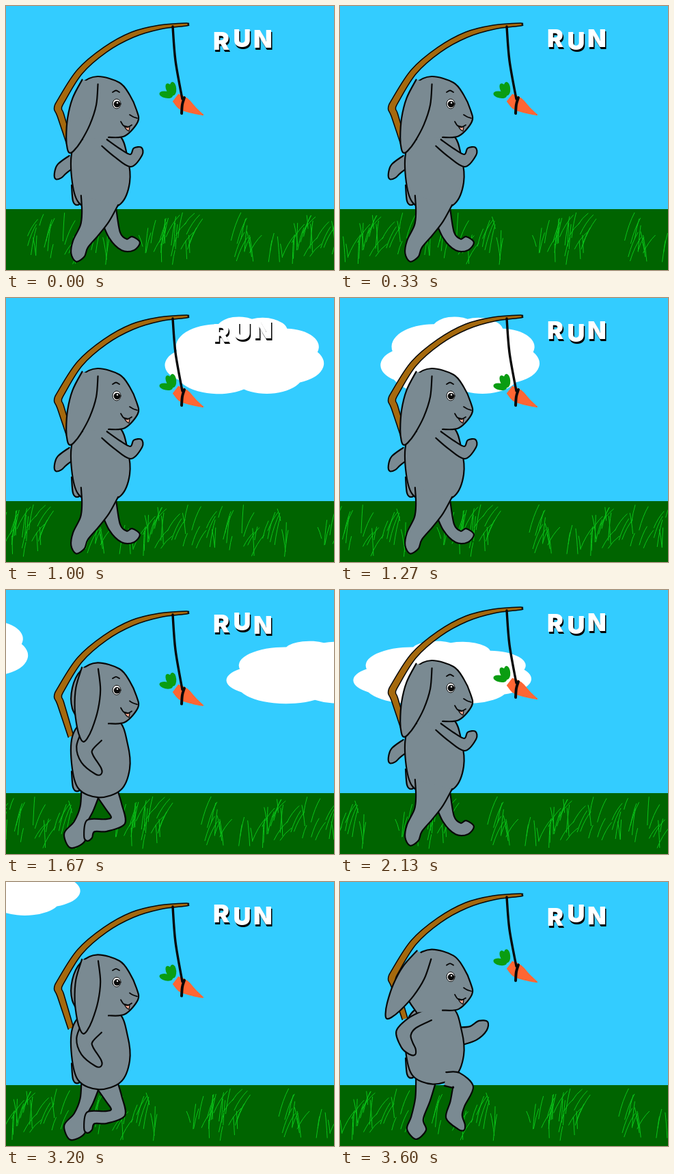
Animation, 480 px wide and 386 px high, one loop 3.67 s. Source, as an HTML page:

```html
<!DOCTYPE html>
<html>
<head>
<meta charset="utf-8">
<style>
html, body { margin: 0; width: 100%; height: 100%; overflow: hidden; background: #33ccff; }
svg { display: block; width: 480px; height: 386px; }
text { font: 900 36px Inter, "Open Sans", sans-serif; }
</style>
</head>
<body>
<svg id="stage" viewBox="0 0 480 386">
  <rect width="480" height="386" fill="#33ccff"/>
  <g id="clouds" fill="#fff"></g>
  <rect y="297" width="480" height="89" fill="#006400"/>
  <g id="grass" fill="none" stroke="#0bc51a" stroke-linecap="round"></g>
  <g id="poses" stroke-linecap="round" stroke-linejoin="round"></g>
  <g id="word"></g>
</svg>
<script>
const LOOP = 3670, STEPS = 55, TILE = 480;
const FUR = '#7a8a92', INK = '#080808';
const $ = id => document.getElementById(id);

function add(parent, tag, attrs = {}) {
  const el = document.createElementNS('http://www.w3.org/2000/svg', tag);
  for (const k in attrs) el.setAttribute(k, attrs[k]);
  parent.appendChild(el);
  return el;
}

const parse = s => s.split(' ').map(p => p.split(',').map(Number));

// Smooth curve through the points
function curve(p, closed) {
  const n = p.length;
  const at = i => closed ? p[(i + n) % n] : p[Math.max(0, Math.min(n - 1, i))];
  let d = 'M' + p[0];
  for (let i = 0; i < (closed ? n : n - 1); i++) {
    const [a, b, c, e] = [at(i - 1), at(i), at(i + 1), at(i + 2)];
    const c1 = b.map((v, k) => v + (c[k] - a[k]) / 6);
    const c2 = c.map((v, k) => v - (e[k] - b[k]) / 6);
    d += `C${c1} ${c2} ${c}`;
  }
  return d + (closed ? 'Z' : '');
}

// Outline around a spine of x,y,radius nodes, open at the first one
function limb(s) {
  const p = parse(s), left = [], right = [];
  let tip;
  p.forEach(([x, y, r], i) => {
    const a = p[Math.max(0, i - 1)], b = p[Math.min(p.length - 1, i + 1)];
    const len = Math.hypot(b[0] - a[0], b[1] - a[1]);
    const ux = (b[0] - a[0]) / len * r, uy = (b[1] - a[1]) / len * r;
    left.push([x + uy, y - ux]);
    right.unshift([x - uy, y + ux]);
    tip = [x + ux, y + uy];
  });
  return curve([...left, tip, ...right]);
}

const shape = (g, d, fill = FUR, w = 2.2) =>
  add(g, 'path', { d, fill, stroke: w ? INK : 'none', 'stroke-width': w });
const line = (g, s, w = 1.8) => shape(g, curve(parse(s)), 'none', w);

// One cloud of bulging arcs, fitted to each box
const notches = parse('8,47 34,16 55,10 77,21 96,48 85,83 50,91 9,80');
const puffs = 'M' + notches[0] + notches.map(([x, y], i) => {
  const [u, v] = notches[(i + 1) % notches.length];
  const r = Math.hypot(u - x, v - y) * 0.64;
  return `A${r} ${r} 0 0 1 ${u},${v}`;
}).join('');
const clouds = [
  { step: 19, x: 58, y: 18, w: 234, h: 127 },
  { step: 32, x: 18, y: 67, w: 262, h: 103 },
  { step: 40, x: 228, y: -50, w: 227, h: 103 }
].map(c => ({ ...c, el: add($('clouds'), 'path', { d: puffs }) }));

let seed = 11;
const rnd = (a, b) => a + (b - a) * (seed = seed * 16807 % 2147483647) / 2147483647;
let blades = '';
for (const mid of [65, 126, 232, 250, 363, 432, 475])
  for (let i = 0; i < 13; i++) {
    const h = rnd(16, 42), lean = rnd(-6, 20);
    blades += `M${mid + rnd(-34, 24)} ${rnd(302 + h, 378)}q${lean * 0.4} ${-h * 0.6} ${lean} ${-h}`;
  }
for (const x of [0, TILE])
  add($('grass'), 'path', { d: blades, transform: `translate(${x})` });

function rod(g, bob) {
  const pole = limb('95,208,4 80,160,5 76,150,5.5 81,138,5 108,96,4.5 145,64,4 185,42,4 225,31,3 264,27,2');
  shape(g, pole, '#a5690d', 1.5).setAttribute('transform', `translate(0 ${bob})`);
  const c = add(g, 'g', { transform: `translate(0 ${bob * 1.6})` });
  for (const turn of [-168, -118, -94])
    add(c, 'ellipse', { cx: 11, rx: 10, ry: 5, fill: '#0a9d12', transform: `translate(245 132) rotate(${turn})` });
  shape(c, limb('248,134,7 260,143,10 276,153,5 288,159,1'), '#ff6633', 0);
  line(c, '261,134 258,144 257,157', 4);
  line(g, `244,${30 + bob} 248,${80 + bob * 1.3} 258,${136 + bob * 1.6}`, 3.4);
}

function head(g, bob) {
  shape(g, curve(parse('150,192 174,190 193,169 191,152 181,130 166,112 134,103 110,114 97,140 97,170 112,195')));
  shape(g, limb('0,0,12 0,30,18 0,60,17 0,88,11 0,103,5'))
    .setAttribute('transform', `translate(123 111) rotate(${16 - 1.8 * bob})`);
  add(g, 'ellipse', { cx: 162, cy: 143, rx: 6, ry: 7, fill: '#fff', stroke: INK });
  add(g, 'circle', { cx: 162.5, cy: 143.5, r: 4.8, fill: INK });
  add(g, 'circle', { cx: 163, cy: 141.5, r: 1.2, fill: '#fff' });
  line(g, '156,126 161,123.5 166,126');
  line(g, '181,159 186,162 192,164');
  shape(g, 'M173 175L181 177L180 183Q175 181 173 175Z', '#f3a58f', 1.2);
  line(g, '168,169 172,175 178,177 184,174');
}

// Contact, low and high drawings; the bob also drives rod, carrot, head and ear
const poses = [
  {
    bob: 0,
    back: ['98,226,9 82,238,9 76,248,6', '149,302,13 159,335,9 173,349,9 186,347,10'],
    front: ['137,284,28 131,308,21 122,328,15 109,348,12 105,364,10',
            '144,200,6 162,214,7 182,226,9 193,213,8']
  },
  {
    bob: 6,
    back: ['124,294,14 118,320,10 108,342,9 100,362,16',
           '147,294,16 158,317,12 164,337,11 146,344,9 124,345,10 120,361,6'],
    front: ['126,212,16 115,231,12 119,247,10 135,265,6']
  },
  {
    bob: -8,
    back: ['178,225,13 195,221,11 209,210,9', '126,288,15 121,318,11 113,345,9 112,362,14'],
    front: ['154,288,10 170,290,12 180,300,15 172,324,11 167,343,12 178,358,6',
            '130,194,9 106,206,9 93,221,11 98,238,9 106,248,6']
  }
].map(({ bob, back, front }) => {
  const g = add($('poses'), 'g');
  const part = () => add(g, 'g', { transform: `translate(0 ${bob * 0.55})` });
  rod(g, bob);
  back.forEach(s => shape(g, limb(s)));
  const body = part();
  shape(body, limb('104,262,8 104,285,6'));
  shape(body, curve(parse('164,188 178,222 181,258 168,289 136,300 106,287 96,250 98,208 120,186'), true));
  front.forEach(s => shape(g, limb(s)));
  head(part(), bob);
  return g;
});

const letters = [...'RUN'].map((ch, k) => {
  const g = add($('word'), 'g'), x = 303 + 29.5 * k;
  add(g, 'text', { x: x + 1.5, y: 3, fill: '#000' }).textContent = ch;
  add(g, 'text', { x, fill: '#fff' }).textContent = ch;
  return g;
});

function draw(ms) {
  const i = Math.floor(ms / LOOP * STEPS + 0.15) % STEPS;
  for (const { el, step, x, y, w, h } of clouds)
    el.setAttribute('transform', `translate(${x + (step - i) * 43.3} ${y}) scale(${w / 100} ${h / 100})`);
  $('grass').setAttribute('transform', `translate(${-(i * 9 / STEPS % 1) * TILE})`);
  const pose = Math.floor((i + 0.2) * 12 / STEPS % 1 * 3);
  poses.forEach((g, k) => g.setAttribute('display', k === pose ? 'inline' : 'none'));
  letters.forEach((g, k) => {
    const y = 61.5 + 2.7 * Math.cos(2 * Math.PI * (i * 4 / STEPS - k / 3 - 0.04));
    g.setAttribute('transform', `translate(0 ${y})`);
  });
}

const start = performance.now();
function tick() {
  draw(performance.now() - start);
  requestAnimationFrame(tick);
}
draw(0);
requestAnimationFrame(tick);
</script>
</body>
</html>
```
